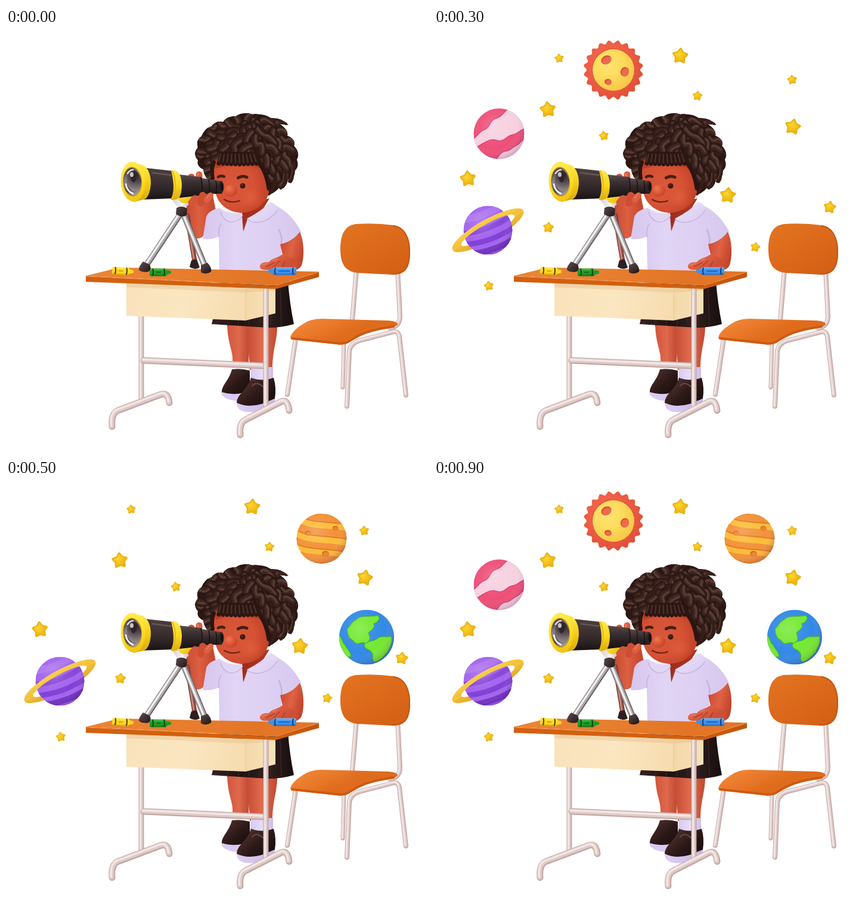
Write an HTML page with a canvas that moves like this. It is 708x710 px and loops after 1.1 s.

```html
<!DOCTYPE html>
<html lang="en">
<head>
<meta charset="utf-8">
<title>Young stargazer</title>
<style>
html, body { margin: 0; width: 100%; height: 100%; overflow: hidden; background: #fff; }
canvas { display: block; width: 100vw; height: 100vh; }
</style>
</head>
<body>
<canvas id="stage" width="708" height="710"></canvas>
<script>
const W = 708, H = 710, LOOP = 1100;
const stage = document.getElementById('stage').getContext('2d');
let c;

// Paint helpers
function stops(g, colors) {
  colors.forEach((col, i) => g.addColorStop(i / (colors.length - 1), col));
  return g;
}
const lin = (x0, y0, x1, y1, ...cols) => stops(c.createLinearGradient(x0, y0, x1, y1), cols);
const rad = (x, y, r, ...cols) => stops(c.createRadialGradient(x, y, 0, x, y, r), cols);

function shape(d, paint) {
  c.fillStyle = paint;
  c.fill(new Path2D(d));
}
function line(d, width, paint, cap = 'round') {
  c.lineWidth = width;
  c.lineCap = cap;
  c.lineJoin = 'round';
  c.strokeStyle = paint;
  c.stroke(new Path2D(d));
}
function oval(x, y, rx, ry, paint, angle = 0) {
  c.beginPath();
  c.ellipse(x, y, rx, ry, angle, 0, Math.PI * 2);
  c.fillStyle = paint;
  c.fill();
}
function tube(d, width, cols = ['#c4a7a4', '#decbc9', '#f2e7e5']) {
  line(d, width, cols[0]);
  c.save();
  c.translate(-width * .06, -width * .06);
  line(d, width * .72, cols[1]);
  c.translate(-width * .08, -width * .08);
  line(d, width * .3, cols[2]);
  c.restore();
}
function clipped(d, draw) {
  c.save();
  c.clip(new Path2D(d));
  draw();
  c.restore();
}
function sphere(x, y, r, paint, detail) {
  c.save();
  c.translate(x, y);
  c.beginPath();
  c.arc(0, 0, r, 0, Math.PI * 2);
  c.clip();
  c.fillStyle = paint;
  c.fillRect(-r, -r, 2 * r, 2 * r);
  c.save();
  detail();
  c.restore();
  oval(0, 0, r, r, rad(-r * .25, -r * .3, r * 1.35, '#ffffff30', '#ffffff10', '#ffffff00', '#3a004030'));
  c.restore();
}
function random(seed) {
  return () => (seed = seed * 16807 % 2147483647) / 2147483647;
}

const STEEL = ['#6d6567', '#b0abac', '#f4f2f2'];

function chair() {
  tube('M567 530L565 603', 7);
  tube('M588 406L581 490', 8);
  tube('M657 406L661 484Q661 500 645 504', 8);
  shape('M588 329Q620 327 650 331C671 334 679 356 678 380C677 405 668 414 648 414L590 411C570 409 561 397 561 372C561 347 568 331 588 329Z',
    lin(590, 329, 640, 415, '#e1721f', '#dc691b', '#d46115'));
  line('M650 332C671 335 678 356 677 380C676 404 668 413 648 413', 2, '#c4560f');
  tube('M486 522L472 615', 8);
  tube('M572 635L576 543Q577 530 592 525L650 510Q658 508 660 518L671 616', 8);
  shape('M477 519Q480 508 498 497Q510 488 530 488L640 491Q656 492 657 497Q655 503 630 506C598 510 589 520 575 528Q567 533 555 531L484 523Q477 522 477 519Z',
    lin(510, 488, 530, 532, '#ef8538', '#e97829', '#df6b1c'));
  line('M480 521L555 529Q566 531 575 526C589 518 600 508 650 501', 4, '#cd5a11');
}

function legsAndSkirt() {
  shape('M371 492H410L407 562H380C382 541 371 532 371 492Z', lin(371, 0, 410, 0, '#d2553c', '#df694c', '#bb452f'));
  shape('M404 494H455C456 525 447 536 447 574H409C409 545 403 530 404 494Z', lin(404, 0, 455, 0, '#c64c34', '#e06b4d', '#c2482f'));
  shape('M361 611Q362 621 380 625Q396 628 402 617L410 598L394 604Z', '#d9caf1');
  shape('M379 573Q394 571 409 575L409 598L398 612Q383 617 362 611C362 599 374 592 379 573Z',
    lin(370, 575, 405, 616, '#4b302c', '#2c1917', '#170c0b'));
  shape('M411 570L448 569V598H409Z', lin(409, 0, 449, 0, '#d8c8ef', '#e7dcfa', '#cdbbe6'));
  shape('M387 627Q386 641 400 644Q416 647 432 639L451 632V618Z', lin(388, 0, 451, 0, '#dccef4', '#cab7e7'));
  shape('M411 587Q429 594 449 587Q454 604 451 622L429 631Q405 638 387 629C388 613 406 607 411 587Z',
    lin(400, 590, 440, 635, '#50342f', '#2d1a18', '#170c0b'));
  line('M413 601Q420 592 431 602', 2, '#6a4a43');
  shape('M358 425H473Q476 463 483 497Q462 503 440 503L345 497Q354 462 358 425Z', lin(350, 0, 482, 0, '#34201d', '#1e1211', '#30201e', '#170e0e'));
  for (let x = 372; x < 480; x += 18) line(`M${x - 2} 435L${x} 499`, 1.5, '#3b2421');
}

function torso() {
  shape('M305 275C300 313 303 336 310 346C319 359 333 353 336 340L352 306L346 276Z',
    lin(303, 0, 346, 0, '#c54a32', '#de6042', '#c64a30'));
  shape('M390 298L442 286L430 306L407 323L398 342Z', lin(400, 300, 430, 320, '#982817', '#b33a24'));
  shape('M358 302C346 305 339 309 336 317L330 354Q344 356 357 350L358 408H462V363Q480 359 495 342C485 321 468 304 446 295Q430 315 405 321L398 342L396 314Q376 315 358 302Z',
    lin(335, 0, 490, 0, '#d8c7ee', '#e1d5f5', '#ddd0f2', '#d8c8ef'));
  line('M462 363Q464 351 458 339', 3, '#c7b4e0');
  line('M357 350Q356 336 361 329', 2, '#c9b6e2');
  shape('M359 302Q376 314 396 310L397 315Q387 328 374 325Q361 320 359 302Z', '#e1d5f5');
  line('M360 308Q363 321 374 325Q387 328 397 315', 1.2, '#bfacd9');
  shape('M404 320Q431 306 443 292Q455 295 456 306C444 325 419 332 404 320Z', lin(420, 300, 440, 325, '#e9def9', '#dccef2'));
  line('M405 321C419 332 443 325 455 306', 1.2, '#bfacd9');
}

function lock(x, y, angle, size, bend) {
  c.save();
  c.translate(x, y);
  c.rotate(angle);
  const d = `M${-size} ${-bend}Q${-size * .3} ${bend} 0 0T${size} ${bend}`;
  line(d, 14, '#271411');
  line(d, 11, '#37201b');
  c.translate(0, -1);
  line(d, 6.5, '#432a24');
  c.translate(0, -1);
  line(d, 2.4, '#5d4038');
  c.restore();
}

function hair() {
  const outline = 'M347 262Q332 251 331 237Q319 232 322 222Q313 211 322 201Q318 188 328 182Q332 169 345 165Q352 155 364 158Q371 147 386 148Q398 140 413 145Q432 143 444 151Q462 150 474 163L459 161Q474 171 472 181Q487 187 483 198Q494 210 488 221Q493 235 482 241Q485 254 478 261L473 253Q472 267 460 271L462 261Q457 274 440 281L432 240H358Z';
  shape(outline, '#2c1713');
  const rnd = random(29), n = 58;
  clipped(outline, () => {
    for (let i = n; i > 0; i--) {
      const r = Math.sqrt(i / n), a = i * 2.39996;
      const x = 404 + 80 * r * Math.cos(a), y = 205 + 59 * r * Math.sin(a);
      const flow = Math.atan2(y - 170, x - 405) + (rnd() - .5) * 1.1;
      lock(x, y, flow, 12 + rnd() * 8, 3 + rnd() * 5);
    }
  });
  line('M443 154Q458 153 470 161', 4, '#3a211c');
  line('M482 226Q484 246 476 257M468 240Q470 258 461 268M452 249Q452 266 441 278', 6, '#351d18');
  line('M480 230Q481 245 476 253M466 244Q467 257 460 265', 1.5, '#5b3e36');
}

function face() {
  const outline = 'M350 222C346 246 348 264 353 282C359 299 377 310 394 310C417 310 436 297 441 276Q440 249 424 222Z';
  shape(outline, rad(384, 266, 66, '#da5839', '#d55235', '#bc3c24'));
  clipped(outline, () => {
    shape('M345 215H440L434 237Q390 224 352 236Z', '#9f2c1a70');
    oval(412, 285, 19, 15, rad(412, 285, 19, '#e6633e90', '#e6633e00'));
  });
  for (let x = 357; x < 427; x += 7) {
    const end = 229 - Math.abs(x - 391) * .05;
    line(`M${x + (391 - x) * .12} 211Q${x + 3} 220 ${x} ${end}`, 7, '#2b1612');
    line(`M${x + (391 - x) * .12 - 1} 212L${x} ${end - 3}`, 2.4, '#4a2f28');
  }
  line('M424 226Q437 241 441 269', 7, '#2b1510');
  line('M349 225Q344 237 347 252', 6, '#2b1510');
  line('M389.5 251.5Q397 247 404 250.5', 5, '#47200f');
  line('M356 250Q361 247 366 249.5', 4.5, '#47200f');
  oval(397, 265, 4.6, 4.6, '#3c1c14');
  oval(396, 263.5, 1, 1, '#76483c');
  oval(377, 273, 11, 10, rad(374, 269, 14, '#ef7653', '#df5c3d', '#c9452c'));
  line('M366 288Q379 295 392 290', 2, '#701f13');
}

function desk() {
  tube('M227 480V624', 9);
  tube('M178 669Q176 647 188 642L260 615Q272 611 274 629', 11);
  tube('M231 558L432 567', 11);
  shape('M202 428L402 436V491L202 483Z', lin(202, 430, 402, 490, '#f9e2ba', '#fbe6c1', '#f6dbad'));
  shape('M402 434H452V479L402 491Z', lin(402, 0, 452, 0, '#f3d9a9', '#f8e1b9'));
  shape('M202 428L452 437V440L402 444L202 435Z', '#dcb07a50');
  line('M402 440V490', 1, '#e6c990');
  tube('M436 436V636', 9);
  tube('M393 683Q391 662 403 657L462 627Q473 623 475 642', 11);
  shape('M134 416L453 433V438L134 426Z', '#d2600f');
  shape('M453 432L525 409V418L453 438Z', lin(453, 0, 525, 0, '#cf5d10', '#c2540d'));
  shape('M134 416L190 402L525 409L453 432Z', lin(180, 402, 420, 435, '#ea8435', '#e77d2d', '#e37526'));
  line('M135 417L453 432L524 410', 1, '#ee9148');
}

function crayon(x, y, len, angle, flip, cols) {
  c.save();
  c.translate(x, y);
  c.rotate(angle);
  c.scale(flip, 1);
  const h = len / 2;
  const body = lin(0, -6.5, 0, 7, cols[1], cols[0], cols[0], cols[2]);
  shape(`M${-h} -4Q${-h} -6.5 ${-h + 3} -6.5H${h - 9}L${h - 7} -4L${h} -2V2L${h - 7} 4L${h - 9} 6.5H${-h + 3}Q${-h} 6.5 ${-h} 4Z`, body);
  line(`M${-h + 5} -6Q${-h + 7} 0 ${-h + 5} 6M${h - 12} -6Q${h - 10} 0 ${h - 12} 6`, 2, cols[3], 'butt');
  line(`M${-h + 12} 0H${h - 18}`, 2, cols[2]);
  c.restore();
}

function restingArm() {
  shape('M460 363Q480 359 493 342C500 357 501 384 496 398Q492 407 479 407L461 402Q455 390 464 381Z',
    lin(458, 370, 498, 380, '#cb4c33', '#df6244', '#c1442c'));
  shape('M465 379C457 386 446 386 441 393Q428 392 426 399Q425 406 435 406L481 406L488 390Z', lin(440, 383, 460, 408, '#e3694a', '#cd4f36'));
  line('M436 401L450 394M447 403L459 391M462 403L468 392', 1.6, '#b2402a');
  line('M429 398L439 395M447 390L454 388', 2, '#e9785a');
}

function telescope() {
  tube('M304 315L316 388', 8, ['#7d3430', '#9c5148', '#c88c80']);
  shape('M311 390L320 388L325 402Q316 407 308 401Z', '#2d2020');
  line('M311 283V250', 11, '#cf5035');
  shape('M311 254H329V284H311Z', '#c84a30');
  line('M324 280V246', 11, '#dc5d40');
  line('M322 249V245', 3, '#ec7b5a');
  tube('M292 313L237 396', 10, STEEL);
  tube('M298 313L333 398', 10, STEEL);
  shape('M230 392L241 397Q245 405 239 409Q228 411 223 406Q222 401 230 392Z', lin(225, 395, 242, 410, '#594648', '#241819'));
  shape('M327 398L338 394Q346 403 344 409Q336 415 327 410Z', lin(328, 395, 342, 412, '#594648', '#241819'));
  shape('M277 284Q283 300 295 302Q310 300 314 281Z', lin(278, 0, 314, 0, '#d7d1d2', '#f5f2f2', '#aca4a5'));
  oval(300, 286, 11, 8, lin(290, 279, 306, 294, '#ffe74a', '#edbd10'));
  shape('M286 302Q295 297 304 303L303 314Q295 320 285 312Z', lin(286, 300, 304, 316, '#55464a', '#201819'));

  shape('M323 251L362 257Q368 267 362 278L323 279Z', lin(0, 252, 0, 280, '#594a4b', '#352829', '#1e1516'));
  shape('M291 246L327 250Q332 265 327 281L291 285Z', lin(0, 246, 0, 285, '#5a4b4b', '#393031', '#2a2021', '#171112'));
  line('M327 251Q331 265 327 280M340 255Q343 266 340 279M352 257Q355 267 352 278', 1.5, '#171011');
  oval(361, 267, 4.5, 10, '#302527');
  oval(362, 267, 2.5, 7, '#181113');
  shape('M226 234L281 240V286L226 288Z', lin(0, 234, 0, 289, '#4d3f3f', '#403435', '#302627', '#171112'));
  line('M246 243L277 247', 2.5, '#665757');
  shape('M281 239Q293 238 295 262Q295 288 284 288Q275 290 277 286Q285 270 277 239Z', lin(0, 239, 0, 289, '#ffe84d', '#f9d81f', '#dcaa0c'));
  line('M279 240Q289 262 279 287', 2, '#e8bb11');

  shape('M211 225L230 230Q243 238 243 261Q241 285 231 288L214 292Z', lin(0, 226, 0, 292, '#ffec50', '#f6cf17', '#d5a60b'));
  oval(213, 258, 20.5, 33.5, lin(198, 228, 227, 291, '#ffec55', '#ffe029', '#f0be10'), -.06);
  oval(212, 258, 16, 25, '#c99c13', -.06);
  oval(212, 258, 15, 23.5, lin(199, 240, 226, 274, '#4b3e42', '#8b8487', '#453b3f', '#a8a1a4'), -.06);
  oval(214, 256, 11, 18, rad(218, 246, 27, '#2d2225', '#574d51', '#8f888b'), -.06);
  oval(214, 250, 5, 9, '#302529');
  line('M201 262Q203 274 213 278', 3, '#f1edef');
  line('M204 244Q208 238 213 238', 2.5, '#e5e0e2');
  oval(211, 246, 3, 4, '#eeeaeccc');

  line('M317 286L311 293', 11, '#d3553a');
  line('M330 281L327 294', 12, '#ce4e34');
  line('M343 281L337 288', 10, '#dc6042');
  line('M342 279L337 285', 3, '#e77455');
}

function star(x, y, r, tilt) {
  c.save();
  c.translate(x, y);
  c.rotate(tilt);
  c.beginPath();
  for (let i = 0; i < 10; i++) {
    const a = i * Math.PI / 5 - Math.PI / 2, k = i % 2 ? r * .5 : r * .84;
    c.lineTo(k * Math.cos(a), k * Math.sin(a));
  }
  c.closePath();
  c.lineJoin = 'round';
  c.lineWidth = r * .3;
  c.strokeStyle = '#e8b314';
  c.stroke();
  c.fillStyle = rad(-r * .2, -r * .25, r, '#fdd535', '#f6c51c', '#ebb313');
  c.fill();
  c.restore();
}
const STARS = [
  [210, 51, 8, -.1], [413, 47, 14, .08], [442, 114, 8.5, .1], [601, 87, 8.5, -.1], [191, 137, 14, -.1],
  [602, 166, 14, .2], [285, 181, 8.5, -.15], [57, 253, 14, -.1], [493, 281, 14, .1], [664, 301, 11, .15],
  [192, 335, 9.5, .1], [539, 368, 8.5, .2], [92, 433, 8.5, -.15]
];

function sun() {
  c.save();
  c.translate(301, 70.5);
  c.beginPath();
  for (let i = 0; i <= 240; i++) {
    const a = i / 240 * Math.PI * 2, r = 47.5 + 2.6 * Math.cos(20 * a + Math.PI);
    c.lineTo(r * Math.cos(a), r * Math.sin(a));
  }
  c.fillStyle = rad(-8, -10, 62, '#f3694d', '#ef6148', '#e04d37');
  c.fill();
  oval(0, 0, 36.5, 36.5, '#e2553a');
  oval(0, 0, 35, 35, rad(-9, -10, 48, '#ffe471', '#fddb5c', '#f7c646'));
  for (const [x, y, rx, ry, a] of [[-12, -17, 9, 7, -.5], [19, 3, 7, 8, .4], [-9, 20, 6, 5, .2]]) {
    oval(x, y, rx, ry, '#d4512f', a);
    oval(x + .8, y + 1, rx - 1, ry - 1, '#ec6a4d', a);
  }
  c.restore();
}

function pinkPlanet() {
  sphere(109, 177.5, 42.5, '#ee4f78', () => {
    const edge = '#d23a68', pale = '#f7d0e0';
    const band = 'M-45 10C-36 6 -33 -3 -25 -6C-14 -9 -16 -21 -5 -25C6 -28 8 -37 20 -44L48 -30V-9C38 -11 33 -1 23 1C13 2 9 13 -1 11C-12 7 -18 10 -26 15C-33 18 -35 23 -43 22Z';
    const foot = 'M-6 46C0 39 2 32 11 30C20 29 23 23 30 20C36 17 38 11 45 9V46Z';
    for (const d of [band, foot]) {
      line(d, 2.5, edge);
      shape(d, pale);
    }
  });
}

function ringedPlanet() {
  const tilt = -.51, x = 90.5, y = 339.5;
  const halfRing = (from, to) => {
    c.save();
    c.translate(x, y);
    c.rotate(tilt);
    c.beginPath();
    c.ellipse(0, 0, 68, 18, 0, from, to);
    c.ellipse(0, 0, 51, 10.5, 0, to, from, true);
    c.closePath();
    c.fillStyle = lin(0, -18, 0, 18, '#f9cf4e', '#f2bf37', '#e0a526');
    c.fill();
    c.restore();
  };
  halfRing(0, Math.PI);
  sphere(x, y, 41, '#a263ee', () => {
    c.rotate(tilt + .16);
    for (const [top, h, col] of [[-29, 12, '#ad74f0'], [-5, 9, '#8746d8'], [14, 9, '#8140d6'], [31, 10, '#7233c8']]) {
      line(`M-43 ${top - 4}Q0 ${top + 7} 43 ${top - 4}`, h, col, 'butt');
    }
  });
  halfRing(Math.PI, Math.PI * 2);
}

function stripedPlanet() {
  sphere(529.5, 100, 42, '#fcbc38', () => {
    c.rotate(.17);
    for (const [y, h] of [[-35, 14], [-11, 14], [12, 11], [34, 15]]) {
      line(`M-44 ${y - 2}C-20 ${y + 8} 17 ${y - 4} 44 ${y - 1}`, h, '#e27722', 'butt');
      line(`M-44 ${y - 3}C-20 ${y + 7} 17 ${y - 5} 44 ${y - 2}`, h - 2, '#f39139', 'butt');
    }
    for (const [x, y, r] of [[-24, -5, 5], [20, -21, 5], [11, 24, 6]]) {
      oval(x, y, r, r * .8, '#d5641d');
      oval(x + .7, y + .7, r - 1, r * .65, '#f08332');
    }
  });
}

function earth() {
  const land = [
    'M-32 -14C-26 -18 -26 -25 -18 -28C-10 -38 4 -32 18 -36C24 -32 18 -25 11 -23C15 -15 7 -13 2 -7C7 2 5 7 -2 10C-8 5 -13 13 -19 9C-23 2 -32 4 -32 -14Z',
    'M-3 12C5 5 12 9 19 2C27 -3 32 2 41 -1C44 11 37 17 35 24C29 30 24 38 14 41C7 38 15 30 8 24C4 19 -4 20 -3 12Z',
    'M-48 -4C-42 -2 -43 8 -37 13C-34 20 -27 24 -27 32L-40 34Z'
  ];
  sphere(605, 265.5, 46, '#3289e6', () => {
    for (const d of land) {
      line(d, 2.5, '#41b32a');
      shape(d, '#74e832');
    }
  });
}

function scene() {
  chair();
  legsAndSkirt();
  torso();
  hair();
  face();
  desk();
  restingArm();
  crayon(196, 408, 36, .06, 1, ['#ffd91f', '#ffee72', '#d6a208', '#4e3c10']);
  crayon(259, 410, 36, 0, 1, ['#1f9a25', '#58c759', '#106c18', '#0b4212']);
  crayon(463.5, 408, 47, 0, -1, ['#3c92ec', '#7fbdf8', '#1f65c0', '#173c75']);
  telescope();
}

const backdrop = document.createElement('canvas');
backdrop.width = W;
backdrop.height = H;
c = backdrop.getContext('2d');
c.fillStyle = '#fff';
c.fillRect(0, 0, W, H);
scene();
c = stage;

function draw(now) {
  const t = now % LOOP;
  c.drawImage(backdrop, 0, 0);
  if (t >= 100) STARS.forEach(s => star(...s));
  if (t >= 300 && t < 500 || t >= 700) {
    sun();
    pinkPlanet();
  }
  if (t >= 300 && t < 700 || t >= 900) ringedPlanet();
  if (t >= 500) {
    stripedPlanet();
    earth();
  }
  requestAnimationFrame(draw);
}
draw(performance.now());
</script>
</body>
</html>
```
